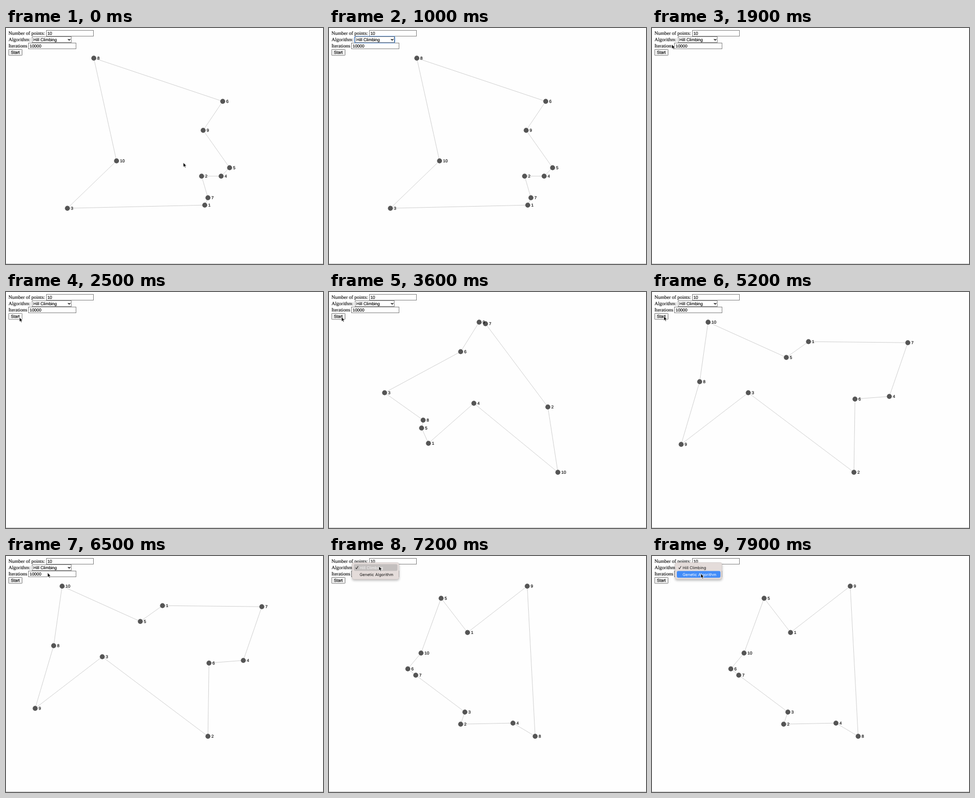
Recreate the animation shown at these times as an HTML page. Size 600 by 448 pixels, loop 8 s.

```html
<!DOCTYPE html>
<html lang="en">
<head>
<meta charset="utf-8">
<title>Route finder</title>
<style>
  html, body { margin: 0; width: 100%; height: 100%; overflow: hidden; background: #fefefe; }
  svg { display: block; width: 600px; height: 448px; }
  text { text-rendering: geometricPrecision; }
  .label { font: 9.41px "Liberation Serif", "Times New Roman", serif; stroke: #000; stroke-width: .12; }
  .ui { font: 8px "Liberation Sans", Arial, sans-serif; stroke: #000; stroke-width: .15; }
  .box { fill: #fff; stroke: #828282; }
  .grey { fill: #efefef; }
  .pressed { fill: #f5f5f5; stroke: #8d8d8d; }
  .edges { fill: none; stroke: #bdbdbd; stroke-width: .7; }
  .nodes { fill: #555; }
  .menu { font: 7.5px Inter, "Liberation Sans", sans-serif; }
  .panel { fill: #e4dcda; stroke: #c6bebc; stroke-width: .5; filter: drop-shadow(0 2px 2px rgba(0, 0, 0, .28)); }
</style>
</head>
<body>
<svg viewBox="0 0 600 448">
  <rect width="600" height="448" fill="#fefefe"/>
  <path d="M0 447.5H600" stroke="#c4c4c4"/>
  <g id="graphs"></g>

  <g class="label">
    <text x="4.7" y="13">Number of points:</text>
    <text x="4.7" y="25">Algorithm:</text>
    <text x="4.7" y="37">Iterations</text>
  </g>
  <rect class="box" x="76.5" y="4.5" width="89" height="11"/>
  <rect class="box" x="42.5" y="28.5" width="90" height="11"/>
  <rect id="ring" x="48.6" y="15.8" width="76" height="12.4" rx="1.5" fill="none" stroke="#4a8fe8" stroke-width="1.2"/>
  <rect class="box" x="49.5" y="16.5" width="74" height="11"/>
  <path d="M117.4 21l2.2 2.2 2.2-2.2" fill="none" stroke="#000" stroke-width="1.3"/>
  <rect id="button" class="box grey" x="5" y="40.5" width="25.5" height="11.5" rx=".8"/>
  <g class="ui">
    <text x="78.4" y="13.1">10</text>
    <text x="51.8" y="24.9">Hill Climbing</text>
    <text x="44.7" y="36.9">10000</text>
    <text x="9.2" y="49.1">Start</text>
  </g>

  <g id="menu" class="menu">
    <rect class="panel" x="43.8" y="12.4" width="88.6" height="31.8" rx="3.6"/>
    <rect id="bar" x="47" width="82.6" height="12.6" rx="2.4"/>
    <path id="tick" d="M50.4 22.3l1.6 2.2 3-5.2" fill="none"/>
    <text id="hill" x="58" y="24.7">Hill Climbing</text>
    <text id="genetic" x="58" y="37.7">Genetic Algorithm</text>
  </g>
  <path id="cursor" d="M0 0V8.4L1.9 6.6 3.2 9.6 4.7 9 3.4 6.1H6Z" stroke="#fff" stroke-width=".7"/>
</svg>
<script>
const $ = id => document.getElementById(id);
const show = (id, on) => { $(id).style.display = on ? "" : "none"; };
const within = (t, a, b) => t >= a && t < b;

// Cities are numbered in list order; the route sweeps around the hub by angle.
const maps = [
  { from: 0, to: 1200, hub: "340 230",
    cities: "376 336, 370 281, 116 342, 407 281, 423 265, 410 139, 382 322, 166 57, 373 194, 209 252" },
  { from: 3600, to: 5200, hub: "260 180",
    cities: "188 287, 414 218, 105 191, 274 211, 175 258, 249 113, 296 60, 178 243, 284 57, 433 342" },
  { from: 5200, to: 6600, hub: "242 140",
    cities: "296 94, 382 342, 182 191, 449 198, 254 124, 384 203, 484 96, 90 170, 55 289, 106 57" },
  { from: 6600, to: 8000, hub: "300 220",
    cities: "262 145, 249 319, 257 296, 348 317, 212 80, 149 214, 164 226, 390 342, 375 57, 174 184" }
];

function drawMap({ hub, cities }, i) {
  const [hx, hy] = hub.split(" ");
  const points = cities.split(", ").map(c => c.split(" ").map(v => +v + .2));
  const angle = ([x, y]) => Math.atan2(y - hy, x - hx);
  const route = [...points].sort((a, b) => angle(a) - angle(b));
  return `<g id="map${i}">
    <path class="edges" d="M${route.join("L")}Z"/>
    <g class="nodes">${points.map(([x, y]) => `<circle cx="${x}" cy="${y}" r="4.7"/>`).join("")}</g>
    <g class="ui">${points.map(([x, y], n) => `<text x="${x + 6.5}" y="${y + 2.8}">${n + 1}</text>`).join("")}</g>
  </g>`;
}
$("graphs").innerHTML = maps.map(drawMap).join("");

// The pointer rests at each stop until the next move begins.
const moves = [
  { start: 0, end: 1, x: 335.6, y: 255.6 },
  { start: 1800, end: 1900, x: 37.6, y: 31.2 },
  { start: 1900, end: 2300, x: 25.4, y: 48.2 },
  { start: 3500, end: 3800, x: 22.4, y: 46 },
  { start: 6100, end: 6850, x: 94.4, y: 19.5 },
  { start: 7500, end: 7900, x: 92.4, y: 33.6 }
];

// Slows down sideways while keeping a steady pace vertically.
function pointer(t) {
  let { x, y } = moves[0];
  for (const m of moves) {
    const k = Math.min(1, Math.max(0, (t - m.start) / (m.end - m.start)));
    x += (m.x - x) * k * (2 - k);
    y += (m.y - y) * k;
  }
  return { x, y };
}

function draw(now) {
  const t = Math.floor(now % 8000 / 100) * 100;   // screen updates ten times a second
  maps.forEach(({ from, to }, i) => show("map" + i, within(t, from, to)));
  show("ring", within(t, 1000, 1200));
  const pressed = within(t, 2500, 3600) || within(t, 4300, 5200) || within(t, 5700, 6200);
  $("button").classList.toggle("pressed", pressed);

  const { x, y } = pointer(t);
  show("cursor", !within(t, 200, 1900));
  $("cursor").setAttribute("transform", `translate(${x} ${y})`);

  const second = y > 28, opening = t < 7300;
  show("menu", t >= 7200);
  $("bar").setAttribute("y", second ? 28.6 : 15.6);
  $("bar").setAttribute("fill", opening ? "#c3bfbe" : "#428cf8");
  $("hill").setAttribute("fill", second ? "#111" : "#fafafa");
  $("tick").setAttribute("stroke", second || opening ? "#111" : "#fff");
  $("genetic").setAttribute("fill", second ? "#fff" : "#111");
  requestAnimationFrame(draw);
}
requestAnimationFrame(draw);
</script>
</body>
</html>
```
